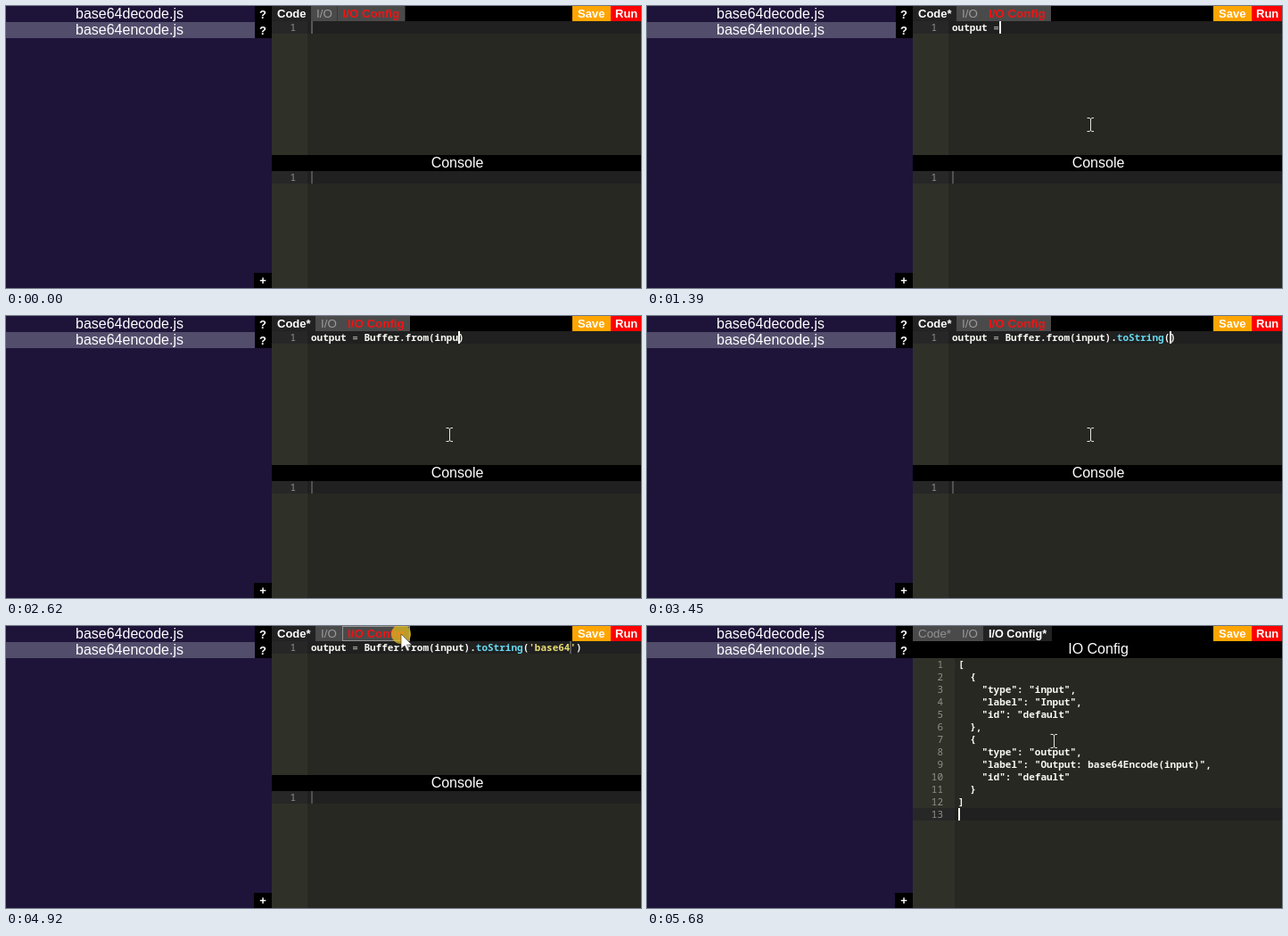
An HTML page for the animation above (8 s loop, 712x316 px).

```html
<!DOCTYPE html>
<html lang="en">
<head>
<meta charset="utf-8">
<title>Script editor</title>
<style>
html, body { margin: 0; width: 100%; height: 100%; overflow: hidden; background: #000; }
svg { display: block; width: 712px; height: 316px; }
text { white-space: pre; fill: #fff; font: 16px "Liberation Sans", Arial, sans-serif; }
.mid { text-anchor: middle; }
.btn { font-size: 13px; font-weight: bold; }
.tab { font-size: 13.333px; }
.code { font: 600 11px "Noto Sans Mono", "DejaVu Sans Mono", monospace; fill: #f8f8f2; }
.num { font: 11px "Noto Sans Mono", "DejaVu Sans Mono", monospace; fill: #8f908a; text-anchor: end; }
.op { fill: #9a9a94; }
.fn { fill: #66d9ef; }
.str { fill: #e6db74; }
.bg { fill: #272822; }
.gutter { fill: #2f3129; }
.line { fill: #202020; }
.gline { fill: #272727; }
</style>
</head>
<body>
<svg viewBox="0 0 712 316">
  <rect width="298" height="316" fill="#1e1338"/>
  <rect y="18" width="279" height="18" fill="#534d6c"/>
  <rect x="279" width="19" height="36"/>
  <rect x="278" y="299" width="20" height="17"/>
  <text class="mid" x="138.5" y="14">base64decode.js</text>
  <text class="mid" x="138.5" y="32">base64encode.js</text>
  <text class="mid btn" x="288" y="13.5">?</text>
  <text class="mid btn" x="288" y="31.5">?</text>
  <text class="mid btn" x="288" y="312">+</text>

  <rect x="298" width="414" height="17"/>
  <g id="tabs"></g>
  <rect x="635" width="43" height="17" fill="#ffa500"/>
  <rect x="678" width="34" height="17" fill="#f00"/>
  <text class="btn" x="641" y="13">Save</text>
  <text class="btn" x="683" y="13">Run</text>

  <g id="codeView">
    <rect class="bg" x="298" y="17" width="414" height="299"/>
    <rect class="gutter" x="298" y="17" width="40" height="299"/>
    <rect class="line" x="338" y="17" width="374" height="14"/>
    <rect class="gline" x="298" y="17" width="40" height="14"/>
    <text class="num" x="325" y="28">1</text>
    <text class="code" id="code" x="342" y="28"></text>
    <rect x="298" y="167" width="414" height="18"/>
    <text class="mid" x="506" y="181">Console</text>
    <rect class="line" x="338" y="185" width="374" height="14"/>
    <rect class="gline" x="298" y="185" width="40" height="14"/>
    <text class="num" x="325" y="196">1</text>
    <rect x="342" y="185" width="2" height="14" fill="#505050"/>
  </g>

  <g id="configView">
    <rect x="298" y="17" width="414" height="19"/>
    <text class="mid" x="506" y="31">IO Config</text>
    <rect class="bg" x="298" y="36" width="414" height="280"/>
    <rect class="gutter" id="gut" x="298" y="36" height="280"/>
    <rect class="line" id="cfgLine" x="298" width="414" height="14"/>
    <rect class="gline" id="cfgGut" x="298" height="14"/>
    <g id="json"></g>
  </g>

  <rect id="caret" height="14"/>
  <g id="mouse">
    <circle id="ring" r="11" fill="#e6be1e" fill-opacity=".72"/>
    <g id="beam" fill="none">
      <path d="M-3.5-7.5H-1L.5-6.5 2-7.5H4M.5-6.5V6.5M-3.5 7.5H-1L.5 6.5 2 7.5H4" stroke="#e4e4e0"/>
    </g>
    <path id="arrow" d="M0 0V16.5L4 13 6.7 19 9.3 17.9 6.6 12H12Z" fill="#fff" stroke="#333" stroke-width=".6"/>
  </g>
</svg>
<script>
const $ = id => document.getElementById(id);
const LOOP = 8000, STEP = 76.8, CH = 6.6;
const SOURCE = "output = Buffer.from(input).toString('base64";
const CONFIG = `[
  {
    "type": "input",
    "label": "Input",
    "id": "default"
  },
  {
    "type": "output",
    "label": "Output: base64Encode(input)",
    "id": "default"
  }
]
`.split("\n");

const show = (id, on) => $(id).style.display = on ? "" : "none";
const set = (id, attrs) => { for (const a in attrs) $(id).setAttribute(a, attrs[a]); };
const span = (cls, s) => s ? `<tspan class="${cls}">${s}</tspan>` : "";
const ease = p => p * p * (3 - 2 * p);
const ramp = (k, a, b) => ease(Math.min(1, Math.max(0, (k - a) / (b - a))));
const mix = (a, b, p) => a.map((v, i) => Math.round(v + (b[i] - v) * p));

// Characters typed by step k; two bracket keys land within one step
const typed = k => k < 11 ? 0 : Math.min(SOURCE.length, k - 10 + (k >= 31) + (k >= 37));

function codeMarkup(n) {
  const s = SOURCE.slice(0, n);
  const close = n >= 21 && n < 27 || n >= 37 ? ")" : "";
  return s.slice(0, 7) + span("op", s.slice(7, 8)) + s.slice(8, 28) +
    (n > 36 ? span("fn", s.slice(28, 36)) : s.slice(28, 36)) + s.slice(36, 37) +
    span("str", s.slice(37) + (n > 37 ? "'" : "")) + close;
}

function tab(x, w, label, active, style) {
  return `<rect x="${x}" width="${w}" height="17" fill="${active ? "#222" : "#4a4a4a"}"/>` +
    `<text class="tab" x="${x + 6}" y="13" style="${style}">${label}</text>`;
}

function tabsMarkup(k) {
  const cfg = k >= 65, pasted = k >= 74, dirty = k >= 11;
  const x1 = dirty ? 347 : 342, x2 = dirty ? 377 : 371.5;
  const focus = k >= 63 && k < 71
    ? `<rect x="${x2 + .5}" y=".5" width="75" height="16" fill="none" stroke="#ddd" stroke-dasharray="1 1"/>` : "";
  return tab(298, x1 - 298, dirty ? "Code*" : "Code", !cfg, cfg ? "fill:#929292" : "font-weight:bold;font-size:13px") +
    tab(x1, x2 - x1, "I/O", false, "fill:#9a9a9a") +
    tab(x2, pasted ? 77 : 76, pasted ? "I/O Config*" : "I/O Config", cfg,
      "font-weight:bold;" + (pasted ? "font-size:12.6px" : "fill:#f01414")) + focus;
}

function drawConfig(pasted) {
  const lines = pasted ? CONFIG : [""];
  const w = pasted ? 47 : 40, y = 36 + 14 * (lines.length - 1);
  set("gut", { width: w });
  set("cfgLine", { y });
  set("cfgGut", { y, width: w });
  $("json").innerHTML = lines.map((s, i) =>
    `<text class="num" x="${285 + w}" y="${47 + 14 * i}">${i + 1}</text>` +
    `<text class="code" x="${302 + w}" y="${47 + 14 * i}">${s}</text>`).join("");
  return [302 + w, y];
}

function drawMouse(k) {
  const start = [579, 218], rest = [497, 133], button = [443, 9], end = [456, 129];
  const [x, y] = k < 55 ? mix(start, rest, ramp(k, 1, 7))
    : k < 65 ? mix(rest, button, ramp(k, 55, 61))
    : mix(button, end, ramp(k, 65, 70));
  const onTabs = y < 17;
  show("mouse", k >= 1);
  show("ring", k === 8 || k === 9 || k === 63 || k === 64 || k === 71 || k === 72);
  show("arrow", onTabs);
  show("beam", !onTabs);
  set("mouse", { transform: `translate(${x} ${y})` });
}

function draw(k) {
  const cfg = k >= 65, n = typed(k);
  const focused = cfg ? k >= 71 : k >= 8 && k < 63;
  show("codeView", !cfg);
  show("configView", cfg);
  $("tabs").innerHTML = tabsMarkup(k);
  $("code").innerHTML = codeMarkup(n);
  const [x, y] = cfg ? drawConfig(k >= 74) : [342 + n * CH, 17];
  set("caret", { x: Math.round(x), y, width: 2, fill: focused ? "#f8f8f0" : "#585858" });
  drawMouse(k);
}

let last = -1;
const origin = performance.now();
function tick() {
  const t = (performance.now() - origin) % LOOP;
  const k = Math.min(74, Math.floor((t + 8) / STEP));
  if (k !== last) draw(last = k);
  requestAnimationFrame(tick);
}
tick();
</script>
</body>
</html>
```
